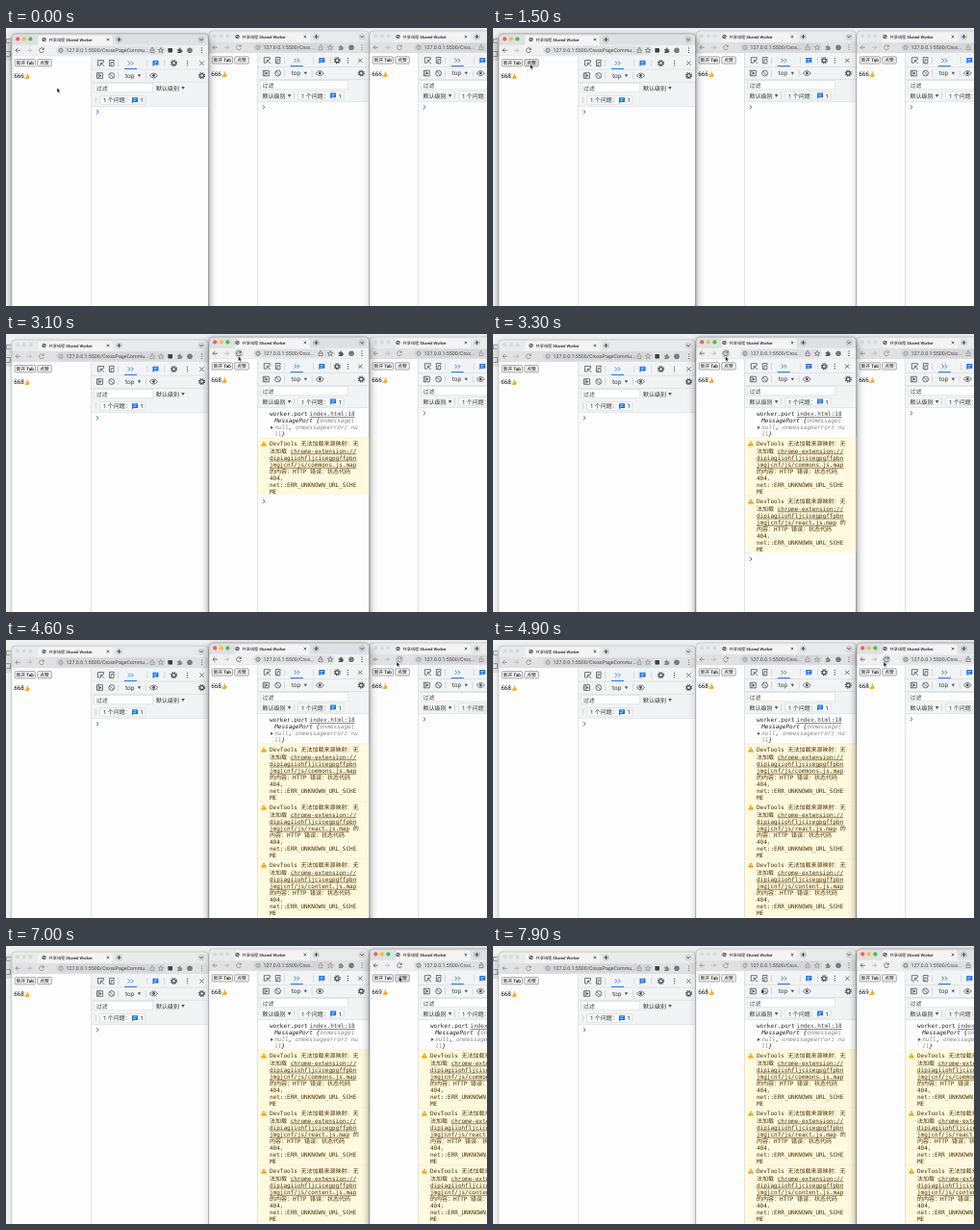
An HTML page for the animation above (8 s loop, 500x289 px).

```html
<!DOCTYPE html>
<html lang="zh-CN">
<head>
<meta charset="utf-8">
<title>Shared Worker</title>
<style>
html, body { margin: 0; width: 100%; height: 100%; overflow: hidden; background: #f1f1f2; }
svg { display: block; width: 500px; height: 289px; }
text { font-family: Roboto, "Noto Sans CJK SC", "Noto Sans CJK", sans-serif; white-space: pre; text-rendering: geometricPrecision; }
.mono { font-family: "DejaVu Sans Mono", "Noto Sans CJK SC", "Noto Sans CJK", monospace; }
.bold { font-weight: 500; }
.link { text-decoration: underline; }
</style>
</head>
<body>
<svg id="stage" viewBox="0 0 500 289"></svg>
<script>
const LOOP = 8000, STEP = 100;
const stage = document.getElementById('stage');
const BLUE = '#1a73e8', INK = '#505459', LINE = '#cfd3d8';

// x, y: window corner; dev: left edge of the tools panel; rows: row centres
const wins = [
  { x: 6, y: 6, w: 204.5, dev: 88.5, title: 38.5, url: '127.0.0.1:5500/CrossPageCommu...',
    rows: [36.5, 49.5, 62.3, 75], prompt: 87.3, count: 50, wide: true,
    right: [86, 100, 115], ext: [146, 155, 174.5, 185, 197.5], square: 164.7 },
  { x: 211, y: 3, w: 166.5, dev: 261.3, title: 34.5, url: '127.0.0.1:5500/Cros...',
    rows: [33.7, 47, 59.3, 70.3], prompt: 82.3, count: 48,
    right: [83, 94, 107], ext: [116, 126, 137, 148, 159] },
];
wins.push({ ...wins[1], x: 378, dev: 428.3 });

// time, x, y of the pointer tip
const path = [
  [0, 53, 62], [100, 53, 62], [900, 38.5, 37.5], [1800, 38.5, 37.5], [2100, 232.5, 76.5],
  [2300, 232.5, 76.5], [2800, 241.5, 23], [3600, 241.5, 23], [4500, 406, 22.5],
  [5000, 406, 22.5], [5400, 408.5, 32], [7000, 408.5, 32], [7700, 279, 44.5], [LOOP, 279, 44.5],
];
const counts = [
  [[0, 666], [1100, 667], [1400, 668]],
  [[0, 666], [2900, 668]],
  [[0, 666], [4900, 668], [6100, 669]],
];
// 0 empty, 1 log line, then one more for each warning
const logs = [
  [[0, 0]],
  [[0, 0], [3000, 1], [3100, 2], [3200, 3], [3500, 4]],
  [[0, 0], [5000, 1], [5100, 3], [5300, 4]],
];
const focus = [[0, 0], [2100, 1], [4700, 2]];
const at = (table, t) => table.filter(k => k[0] <= t).pop()[1];

function pointer(t) {
  const i = path.findIndex(k => k[0] > t);
  const a = path[i - 1], b = path[i];
  const u = (t - a[0]) / (b[0] - a[0]), e = u * u * (3 - 2 * u);
  return [a[1] + (b[1] - a[1]) * e, a[2] + (b[2] - a[2]) * e];
}

const rect = (x, y, w, h, fill, more = '') =>
  `<rect x="${x}" y="${y}" width="${w}" height="${h}" fill="${fill}" ${more}/>`;
const text = (x, y, size, s, fill = '#333', more = '') =>
  `<text x="${x}" y="${y}" font-size="${size}" fill="${fill}" ${more}>${s}</text>`;
const mono = (x, y, s, fill, more = '') => text(x, y, 6, s, fill, `class="mono" ${more}`);
const bold = (x, y, size, s, fill, more = '') => text(x, y, size, s, fill, `class="bold" ${more}`);
const dot = (x, y, r, fill) => `<circle cx="${x}" cy="${y}" r="${r}" fill="${fill}"/>`;
const ring = (x, y, r, c = INK, w = 0.8) =>
  `<circle cx="${x}" cy="${y}" r="${r}" fill="none" stroke="${c}" stroke-width="${w}"/>`;
const draw = (x, y, d, c = INK, w = 0.8, fill = 'none') =>
  `<path transform="translate(${x} ${y})" d="${d}" fill="${fill}" stroke="${c}" stroke-width="${w}"/>`;
const solid = (x, y, d, c) => draw(x, y, d, 'none', 0, c);
const bar = (x, y, h = 7) => rect(x, y - h / 2, 0.6, h, '#c3c7cb');
const cross = (x, y, r, c = INK) => draw(x, y, `M${-r} ${-r}L${r} ${r}M${r} ${-r}L${-r} ${r}`, c);
const dots = (x, y, c = INK) => [-2.3, 0, 2.3].map(d => dot(x, y + d, 0.65, c)).join('');
const gear = (x, y) => ring(x, y, 1.9, INK, 1.3) +
  `<circle cx="${x}" cy="${y}" r="3" fill="none" stroke="${INK}" stroke-width="1.2" stroke-dasharray="1.2 1.156"/>`;
const bubble = (x, y) => solid(x, y, 'M-3 -2.7H3V2H-1.4L-3 3.4Z', BLUE) +
  draw(x, y, 'M-1.6 -1.2H1.6M-1.6 .5H.7', '#fff', 0.6);
const caret = (x, y) => solid(x, y, 'M-1.7 -1.3H1.7L0 1.6Z', INK);

function thumb(x, y) {
  return `<g transform="translate(${x} ${y}) scale(.88)">` +
    solid(0, 0, 'M0 3L1.5 2.7L3.1 -.1Q3 -2.4 4 -2.3Q5 -1.9 4.5 .5L6 .7Q6.9 1.2 6.2 2L6.1 3.4Q5.8 4.4 4.5 4.4H2.4L.3 4Z', '#f6b52d') +
    draw(0, 0, 'M4 1.8H6.1M4 3H6', '#cf8519', 0.35) + '</g>';
}

function chrome(w, active, hot) {
  const { x, y } = w, c = active ? '#55595e' : '#85898d';
  const [strip, tool, pill, button] = active
    ? ['#dee0e3', '#f0f0f1', '#dedfe1', '#c6c9cd'] : ['#e9eaeb', '#e1e1e2', '#d6d6d8', '#d3d5d7'];
  const ty = y + 6, uy = y + 17.2;
  let s = rect(x, y, w.w, 300, strip, 'rx="4"');
  const lights = active ? ['#f4605a', '#f8bd39', '#3fc54a'] : ['#d9dadc', '#d9dadc', '#d9dadc'];
  lights.forEach((l, i) => s += dot(x + 6.2 + i * 6.6, ty - 0.6, 2.1, l));
  s += solid(x, y, 'M25 12Q27.5 12 27.5 9.5V4Q27.5 1.5 30 1.5H102Q104.5 1.5 104.5 4V9.5Q104.5 12 107 12Z', '#f4f4f5');
  const gx = x + w.title - 5;
  s += dot(gx, ty, 2.2, INK) + draw(gx, ty, 'M-1.5 -.6Q0 .4 .6 -1.7M-.7 1.7L.4 .4L1.7 .8', '#fff', 0.6);
  s += bold(x + w.title, ty + 1.5, 4.2, '共享线程 Shared Worker', '#222');
  s += cross(x + 100, ty, 1.3) + dot(x + 111.5, ty, 3.5, button) + draw(x + 111.5, ty, 'M-2 0H2M0 -2V2', '#333');
  s += dot(x + w.w - 7.5, ty, 3.5, button) + draw(x + w.w - 7.5, ty, 'M-1.5 -.7L0 .8L1.5 -.7', '#333');
  s += rect(x, y + 11.8, w.w, 11.2, tool);
  const [share, star, puzzle, face, menu] = w.ext;
  s += rect(x + 46, uy - 4.4, star - 41, 8.8, pill, 'rx="4.4"');
  if (hot) s += dot(x + 31, uy, 4.5, '#cfd1d4');
  s += draw(x + 6.3, uy, 'M2.5 0H-2.3M0 -2.3L-2.3 0L0 2.3', c);
  s += draw(x + 18.3, uy, 'M-2.5 0H2.3M0 -2.3L2.3 0L0 2.3', '#b4b7bb');
  s += draw(x + 31, uy, 'M2 -1.4A2.4 2.4 0 1 0 2.3 .8M2.3 -2.6V-.8H.5', c);
  s += ring(x + 51, uy, 2.1, c, 0.7) + rect(x + 50.7, uy - 0.4, 0.6, 1.6, c) + rect(x + 50.7, uy - 1.3, 0.6, 0.6, c);
  s += text(x + 56.5, uy + 1.9, 5.3, w.url, '#45484c');
  s += draw(x + share, uy, 'M-1 -.6H-2V2.4H2V-.6H1M0 1V-2.8M-1.2 -1.7L0 -2.9L1.2 -1.7', c, 0.6);
  s += draw(x + star, uy, 'M0 -2.7L.8 -.8L2.7 -.7L1.2 .5L1.7 2.4L0 1.3L-1.7 2.4L-1.2 .5L-2.7 -.7L-.8 -.8Z', c, 0.6);
  if (w.square) s += rect(x + w.square - 2.3, uy - 2.3, 4.6, 4.6, '#3c4043', 'rx=".7"');
  s += solid(x + puzzle, uy, 'M-2.4 -1.3H-.8Q-.9 -2.8 .1 -2.8Q1.1 -2.8 1 -1.3H2V0Q3.2 0 3.2 .9Q3.2 1.8 2 1.7V2.9H-2.4V1.6Q-1.1 1.6 -1.1 .8Q-1.1 0 -2.4 0Z', c);
  s += dot(x + face, uy, 2.8, '#777b80') + dots(x + menu, uy, c);
  return s + rect(x, y + 22.7, w.w, 0.5, '#d9dbde');
}

function page(w, count, hot) {
  const y = w.rows[0] - 0.3, x = w.x + 3.2;
  const button = (bx, bw, label, fill) =>
    rect(bx, y - 3.6, bw, 7.3, fill, 'rx="1" stroke="#777" stroke-width=".6"') +
    bold(bx + bw / 2, y + 1.7, 4.7, label, '#111', 'text-anchor="middle"');
  return rect(w.x, w.y + 23.2, w.w, 290, '#fdfdfd') +
    button(x, 21.3, '新开 Tab', '#f0f0f0') +
    button(x + 23.5, 14.6, '点赞', hot ? '#dcdcdc' : '#f0f0f0') +
    text(w.x + 2.2, w.count + 2.2, 6.4, count, '#111') + thumb(w.x + 12.9, w.count - 0.9);
}

function warning(d, y, file) {
  const head = file === 'react' ? ' 的' : '', rest = head ? '内容' : '的内容';
  const link = s => `<tspan class="link">${s}</tspan>`;
  const lines = [
    'DevTools 无法加载来源映射：无', '法加载 ' + link('chrome-extension://'),
    link('dipiagiiohfljcicegpgffpbn'), link(`jmgjcnf/js/${file}.js.map`) + head,
    rest + '：HTTP 错误：状态代码', '404，', 'net::ERR_UNKNOWN_URL_SCHE', 'ME',
  ];
  return rect(d, y, 120, 60, '#fff9df') + rect(d, y, 120, 0.5, '#f5e9c0') +
    solid(d + 6.7, y + 6.3, 'M0 -3L3.1 2.5H-3.1Z', '#f0a100') + rect(d + 6.35, y + 5.2, 0.7, 1.8, '#fff') +
    lines.map((l, i) => mono(d + 12.7, y + 8.7 + i * 7.15, l, '#4d3300')).join('');
}

function tools(w, log) {
  const d = w.dev, [a, b, c, e] = w.rows, end = w.x + w.w;
  const [g, m, k] = w.right.map(r => d + r);
  const top = w.y + 23.2, floor = e + 6;
  let s = rect(d, top, end - d, floor - top, '#f1f3f4');
  [a + 6.3, b + 6.4, floor].forEach(y => s += rect(d, y, end - d, 0.5, LINE));
  s += draw(d + 10, a, 'M-.5 2.5H-3V-3H3V-.7M0 -.3L3.6 3.3M0 2.4V-.3H2.7', INK);
  s += draw(d + 21, a, 'M-2 -3.2H2.8V-1.6M-2 -3.2V3H-.4M-.3 -.9H2.5V3.2H-.3Z', INK);
  s += bar(d + 28, a) + draw(d + 41, a, 'M-2.6 -2L-.6 0L-2.6 2M.6 -2L2.6 0L.6 2', BLUE, 0.9);
  s += rect(d + 34.5, a + 5.4, 13, 1, BLUE);
  s += bar(d + 58, a) + bubble(d + 67, a) + bar(d + 76, a) + gear(g, a) + dots(m, a) + cross(k, a, 2.1);
  s += draw(d + 9, b, 'M-3 -2.8H3V2.8H-3ZM-1.3 -2.8V2.8', INK) + solid(d + 9, b, 'M-.3 -1.5L2.1 0L-.3 1.5Z', INK);
  s += ring(d + 21.3, b, 2.9) + draw(d + 21.3, b, 'M-2 -2L2 2', INK);
  s += bar(d + 28, b) + text(d + 35.5, b + 2, 6.5, 'top', '#3c4043') + caret(d + 50, b) + bar(d + 56.5, b);
  s += draw(d + 65, b, 'M-4 0Q0 -5 4 0Q0 5 -4 0Z', INK) + dot(d + 65, b, 1.4, INK);
  s += gear(w.wide ? k : d + 108, b);
  const field = w.wide ? 61 : 91;
  s += rect(d + 3.3, c - 4.7, field, 9.2, '#fff', `stroke="${LINE}" stroke-width=".5"`);
  s += text(d + 5.3, c + 2.3, 6, '过滤', '#444');
  const lx = w.wide ? d + 67.5 : d + 5.3, ly = w.wide ? c : e;
  s += text(lx, ly + 2.2, 6, '默认级别', '#333') + caret(lx + 28, ly);
  const ix = w.wide ? d + 9 : d + 42.3;
  s += bar(ix - 4.5, e) + rect(ix, e - 4.4, 47.5, 8.8, '#f6f7f8', `rx="1" stroke="${LINE}" stroke-width=".5"`);
  s += text(ix + 3.4, e + 2.2, 6, '1 个问题：', '#333') + bubble(ix + 36.5, e) + text(ix + 42, e + 2.2, 6, '1', '#333');

  let y = w.prompt;
  if (log) {
    const gray = v => `<tspan fill="#8a8a8a">${v}</tspan>`;
    const it = 'font-style="italic"';
    s += mono(d + 12.7, 85, 'worker.port', '#222');
    s += mono(d + 101.2, 85, 'index.html:18', '#444', 'text-anchor="end" text-decoration="underline"');
    s += mono(d + 17.9, 92.2, `MessagePort {${gray('onmessage')}:`, '#222', it);
    s += solid(d + 15, 97.2, 'M-1.2 -1.8L1.5 0L-1.2 1.8Z', INK);
    s += mono(d + 17.9, 99.3, `${gray('null')}, ${gray('onmessageerror')}: ${gray('nu')}`, '#222', it);
    s += mono(d + 17.9, 106.4, `${gray('ll')}}`, '#222', it);
    ['commons', 'react', 'content'].slice(0, log - 1).forEach((f, i) => s += warning(d, 107.7 + i * 60, f));
    y = 114 + (log - 1) * 60;
  }
  return s + rect(d, top, 0.6, 290, '#d2d4d6') + draw(d + 6.7, y, 'M-1.2 -2L1 0L-1.2 2', '#2f7de1', 1);
}

function frame(w, t, i, front, [px, py]) {
  const active = i === front, near = (x, y, rx, ry) => Math.abs(px - x) < rx && Math.abs(py - y) < ry;
  const reload = near(w.x + 31, w.y + 19, 5, 5), like = near(w.x + 33, w.rows[0], 8, 4);
  return rect(w.x, w.y + 3, w.w, 320, '#000', `rx="4" filter="url(#soft)" opacity="${active ? 0.5 : 0.2}"`) +
    `<g clip-path="url(#clip${i})">` + chrome(w, active, reload) + page(w, at(counts[i], t), like) + tools(w, at(logs[i], t)) + '</g>' +
    rect(w.x, w.y, w.w, 300, 'none', `rx="4" stroke="#777" stroke-width=".5" opacity="${active ? 0.8 : 0.45}"`);
}

const defs = '<defs><filter id="soft" x="-20%" y="-10%" width="140%" height="120%"><feGaussianBlur stdDeviation="4.5"/></filter>' +
  wins.map((w, i) => `<clipPath id="clip${i}">${rect(w.x, w.y, w.w, 300, '#000', 'rx="4"')}</clipPath>`).join('') + '</defs>';
const backdrop = rect(0, 0, 500, 289, '#f1f1f2') + rect(0, 10, 6, 24, '#e2e3e5') +
  draw(2.5, 13.5, 'M2 -2H-2V2H2', '#888', 0.7) + draw(2.5, 27, 'M-2 -2.5H2V2.5H-2', '#777', 0.7) +
  rect(0, 34, 6, 255, '#f8f8f8');

function scene(t) {
  const front = at(focus, t), tip = pointer(t);
  const order = [0, 1, 2].filter(i => i !== front).concat(front);
  return defs + backdrop + order.map(i => frame(wins[i], t, i, front, tip)).join('') +
    draw(tip[0], tip[1], 'M0 0V5.2L1.2 4.2L2 6.1L3 5.7L2.2 3.8H3.8Z', '#fff', 0.5, '#111');
}

let shown = -1;
const start = performance.now();
function tick() {
  const t = Math.floor((performance.now() - start) % LOOP / STEP) * STEP;
  if (t !== shown) stage.innerHTML = scene(shown = t);
  requestAnimationFrame(tick);
}
tick();
</script>
</body>
</html>
```
